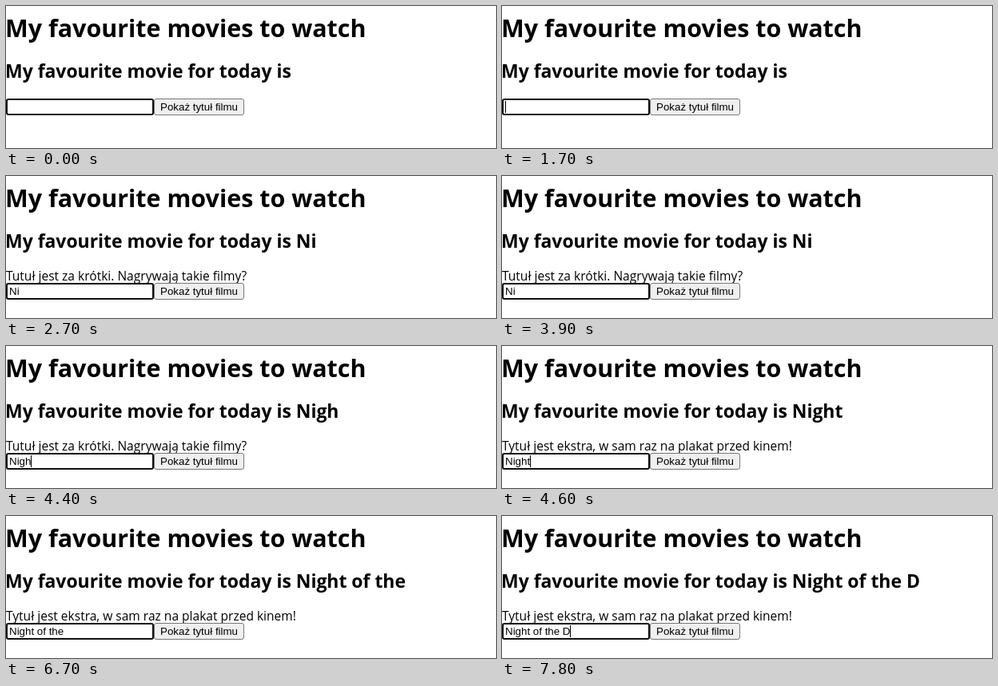
Write an HTML page that moves like this. It is 613 px wide and 178 px high and loops after 8000 ms.

```html
<!DOCTYPE html>
<html lang="pl">
<head>
<meta charset="utf-8">
<title>Favourite movies</title>
<style>
  html, body { margin: 0; width: 100%; height: 100%; overflow: hidden; background: #fff; }
  svg { display: block; }
  text { white-space: pre; fill: #000; }
  .page { font-family: "Open Sans", "Noto Sans", sans-serif; }
  .bold { font-weight: 700; }
  .form { font: 13.333px "Liberation Sans", Arial, sans-serif; }
</style>
</head>
<body>
<svg width="613" height="178" viewBox="0 0 613 178">
  <text class="page bold" x="-1" y="39" font-size="30.45">My favourite movies to watch</text>
  <text class="page bold" id="heading" x="-1" y="90" font-size="22.95"></text>
  <text class="page" id="message" x="0" y="131" font-size="15.55"></text>
  <g id="form">
    <rect x="1" y="117" width="183" height="19" rx="2" fill="#fff" stroke="#101010" stroke-width="2"/>
    <text class="form" id="value" x="4" y="131"></text>
    <rect id="caret" y="119" width="1" height="15"/>
    <rect x="185.5" y="116.5" width="112" height="20" rx="2.5" fill="#efefef" stroke="#767676"/>
    <text class="form" x="193" y="131">Pokaż tytuł filmu</text>
  </g>
</svg>
<script>
  const LOOP = 8000, BLINK = 600, MIN_LENGTH = 5, LINE = 18, TEXT_X = 4;
  const SHORT = "Tutuł jest za krótki. Nagrywają takie filmy?";
  const GOOD = "Tytuł jest ekstra, w sam raz na plakat przed kinem!";
  const TITLE = "Night of the D";

  // [time in ms, typed characters]; the first entry sets the blink phase
  const KEYS = [
    [-700, 0], [1800, 1], [2100, 2], [4300, 3], [4400, 4], [4600, 5], [4700, 6],
    [5200, 8], [5300, 9], [5800, 11], [6000, 12], [6100, 13], [7800, 14]
  ];

  const [heading, message, form, value, caret] =
    ["heading", "message", "form", "value", "caret"].map(id => document.getElementById(id));
  const pen = document.createElement("canvas").getContext("2d");
  pen.font = '13.333px "Liberation Sans", Arial, sans-serif';

  function draw(t) {
    const [start, count] = KEYS.filter(key => key[0] <= t).pop();
    const typed = TITLE.slice(0, count);
    const caretOn = Math.floor((t - start) / BLINK) % 2 === 0;

    heading.textContent = "My favourite movie for today is " + typed;
    message.textContent = !count ? "" : count < MIN_LENGTH ? SHORT : GOOD;
    form.setAttribute("transform", `translate(0 ${count ? LINE : 0})`);
    value.textContent = typed;
    caret.setAttribute("x", Math.floor(TEXT_X + pen.measureText(typed).width));
    caret.setAttribute("visibility", caretOn ? "visible" : "hidden");
  }

  // The empty field blinks on at 500, off at 1100 and on at 1700
  const origin = performance.now();
  function tick() {
    draw((performance.now() - origin) % LOOP);
    requestAnimationFrame(tick);
  }
  tick();
</script>
</body>
</html>
```
